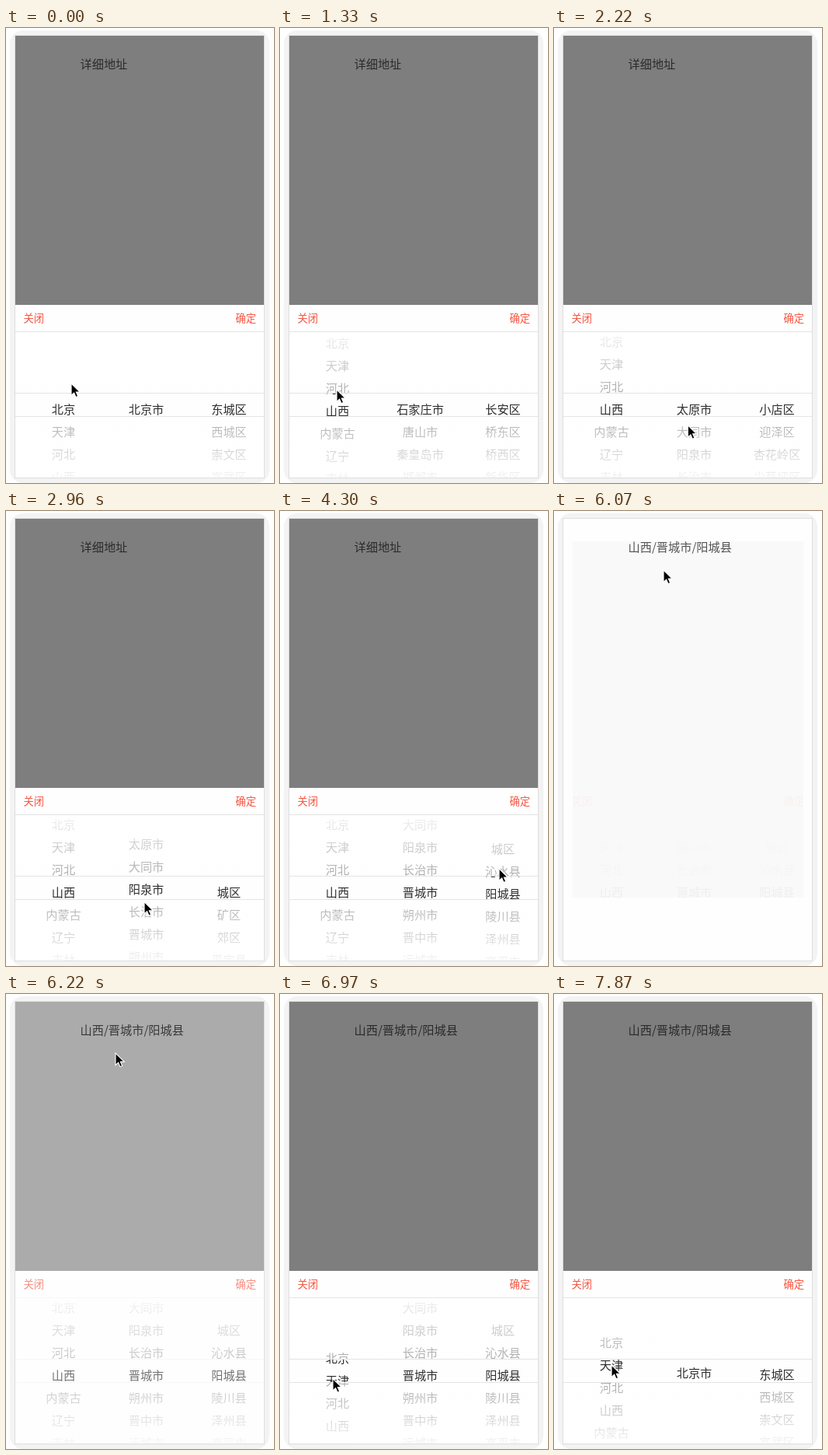
Write an HTML page that moves like this. It is 345 by 585 pixels and loops after 8 s.

```html
<!DOCTYPE html>
<html lang="zh-CN">
<head>
<meta charset="utf-8">
<title>地址选择</title>
<style>
html, body { margin: 0; width: 100%; height: 100%; overflow: hidden; background: #fefefe; }
svg { display: block; width: 345px; height: 585px; font: 15.2px "Noto Sans CJK SC", "Noto Sans CJK", sans-serif; }
.bar { font-size: 13.3px; fill: #f65642; }
.col { text-anchor: middle; fill: #2e2e2e; }
#lines { fill: #e4e4e4; }
</style>
</head>
<body>
<svg viewBox="0 0 345 585">
  <defs>
    <linearGradient id="up" x1="0" y1="0" x2="0" y2="1">
      <stop offset="0" stop-color="#fff" stop-opacity=".95"/>
      <stop offset="1" stop-color="#fff" stop-opacity=".6"/>
    </linearGradient>
    <linearGradient id="down" x1="0" y1="0" x2="0" y2="1">
      <stop offset="0" stop-color="#fff" stop-opacity=".6"/>
      <stop offset="1" stop-color="#fff" stop-opacity=".95"/>
    </linearGradient>
    <clipPath id="wheel"><rect x="12" y="391" width="320" height="187"/></clipPath>
    <clipPath id="view"><rect id="window"/></clipPath>
  </defs>
  <rect x="5" y="3" width="334" height="582" rx="17" fill="#f3f3f3"/>
  <rect x="11.5" y="9.5" width="321" height="569" fill="#fefefe" stroke="#dedede"/>
  <text id="title" x="95.5" y="52" fill="#555"></text>
  <g clip-path="url(#view)">
    <rect id="dim" x="12" y="10" width="320" height="568"/>
    <g id="panel">
      <rect x="12" y="356" width="320" height="222" fill="#fefefe"/>
      <text class="bar" x="22.4" y="378">关闭</text>
      <text class="bar" x="322" y="378" text-anchor="end">确定</text>
      <g id="cols" clip-path="url(#wheel)"></g>
      <rect x="12" y="391" width="320" height="78" fill="url(#up)"/>
      <rect x="12" y="500" width="320" height="78" fill="url(#down)"/>
      <g id="lines">
        <rect x="12" y="390" width="320" height="1"/>
        <rect x="12" y="469" width="320" height="1"/>
        <rect x="12" y="499" width="320" height="1"/>
      </g>
    </g>
  </g>
  <path id="cursor" d="M0 0V15.4L3.6 12.1L6 17.6L8.7 16.4L6.3 11.1H11.2Z" stroke="#fff" stroke-width="1.1"/>
</svg>
<script>
const LOOP = 8000, STEP = 148.3;           // the screen refreshes once per STEP
const ROW = 29, MID = 496;                 // row height, baseline of the chosen row
const PICK = 300, GLIDE = 120;             // delay before a choice counts, glide time constant
const CLOSE = 5043, OPEN = 6070, FADE = 240;
const $ = id => document.getElementById(id);

const provinces = '北京 天津 河北 山西 内蒙古 辽宁 吉林 黑龙江 上海';
const cities = {
  北京: '北京市',
  河北: '石家庄市 唐山市 秦皇岛市 邯郸市 邢台市 保定市',
  山西: '太原市 大同市 阳泉市 长治市 晋城市 朔州市 晋中市 运城市 忻州市 临汾市'
};
const districts = {
  北京市: '东城区 西城区 崇文区 宣武区 朝阳区 丰台区',
  石家庄市: '长安区 桥东区 桥西区 新华区 裕华区',
  太原市: '小店区 迎泽区 杏花岭区 尖草坪区 万柏林区',
  阳泉市: '城区 矿区 郊区 平定县 盂县',
  晋城市: '城区 沁水县 阳城县 陵川县 泽州县 高平市'
};

// Drags scroll a column by some pixels and end at x, y; taps have no column
const drag = (at, ms, col, by, x, y) => ({ at, ms, col, by, x, y });
const tap = (at, ms, x, y) => ({ at, ms, by: 0, x, y });
const gestures = [
  drag(300, 440, 0, 56, 74, 440),
  drag(1180, 150, 0, 27, 73, 465),
  drag(2320, 240, 1, 56, 175, 456),
  drag(2880, 500, 1, 56, 178, 451),
  drag(3850, 440, 2, 56, 282, 460),
  tap(4960, 250, 299, 353),
  tap(6040, 300, 141, 76),
  drag(6670, 441, 0, -85, 68, 515),
  drag(7560, 310, 0, 42, 74, 477)
];

const clamp = v => Math.max(0, Math.min(1, v));
const smooth = v => (v = clamp(v), v * v * (3 - 2 * v));
const mix = (a, b, p) => a + (b - a) * p;
const glide = (from, to, t) => mix(to, from, Math.exp(-t / GLIDE));

function stateAt(t) {
  const offset = [0, 0, 0], rest = [0, 0, 0], pick = [0, 0, 0];
  let x = 84, y = 457, end = 0;
  for (const g of gestures) {
    const startY = g.y + g.by;
    if (t < g.at) {
      const p = smooth((t - end) / (g.at - end));
      x = mix(x, g.x, p);
      y = mix(y, startY, p);
      break;
    }
    const p = smooth((t - g.at) / g.ms);
    end = g.at + g.ms;
    x = g.x;
    y = mix(startY, g.y, p);
    if (g.col === undefined) continue;

    const c = g.col, to = rest[c] + g.by, row = Math.round(to / ROW);
    offset[c] = t < end ? mix(rest[c], to, p) : glide(to, row * ROW, t - end);
    if (t >= end) rest[c] = row * ROW;
    if (t < end + PICK) continue;
    pick[c] = row;
    for (let k = c + 1; k < 3; k++) {
      offset[k] = glide(offset[k], 0, t - end - PICK);
      rest[k] = pick[k] = 0;
    }
  }
  const province = provinces.split(' ')[pick[0]];
  const city = cities[province].split(' ')[pick[1]];
  const district = districts[city].split(' ')[pick[2]];
  return {
    x, y, offset,
    lists: [provinces, cities[province], districts[city]],
    address: [province, city, district].join('/')
  };
}

const chosen = stateAt(CLOSE).address;

function setAttrs(el, attrs) {
  for (const k in attrs) el.setAttribute(k, attrs[k]);
}

const columns = [74, 180.5, 287].map(x => {
  const g = document.createElementNS('http://www.w3.org/2000/svg', 'g');
  g.setAttribute('class', 'col');
  $('cols').append(g);
  return { g, x, names: '' };
});

function fill(col, names) {
  if (col.names === names) return;
  col.names = names;
  col.g.innerHTML = names.split(' ')
    .map((name, i) => `<text x="${col.x}" y="${MID + i * ROW}">${name}</text>`).join('');
}

function draw(time) {
  const t = Math.floor((time + 12) / STEP) * STEP;
  const s = stateAt(t);
  const shown = t < OPEN ? 1 - clamp((t - CLOSE) / FADE) : clamp((t - OPEN) / FADE);

  columns.forEach((col, i) => {
    fill(col, s.lists[i]);
    col.g.setAttribute('transform', `translate(0 ${-s.offset[i]})`);
  });
  $('title').textContent = t < CLOSE ? '详细地址' : chosen;

  // while barely visible, the overlay only reaches the area around the texts
  setAttrs($('window'), shown < .1
    ? { x: 24, y: 39, width: 297, height: 458 }
    : { x: 12, y: 10, width: 320, height: 568 });
  setAttrs($('dim'), { opacity: shown / 2, height: shown < .1 ? 568 : 346 });
  $('panel').setAttribute('opacity', shown);
  $('lines').setAttribute('opacity', shown * shown);
  $('cursor').setAttribute('transform', `translate(${s.x} ${s.y})`);
}

function tick() {
  draw(performance.now() % LOOP);
  requestAnimationFrame(tick);
}
tick();
</script>
</body>
</html>
```
